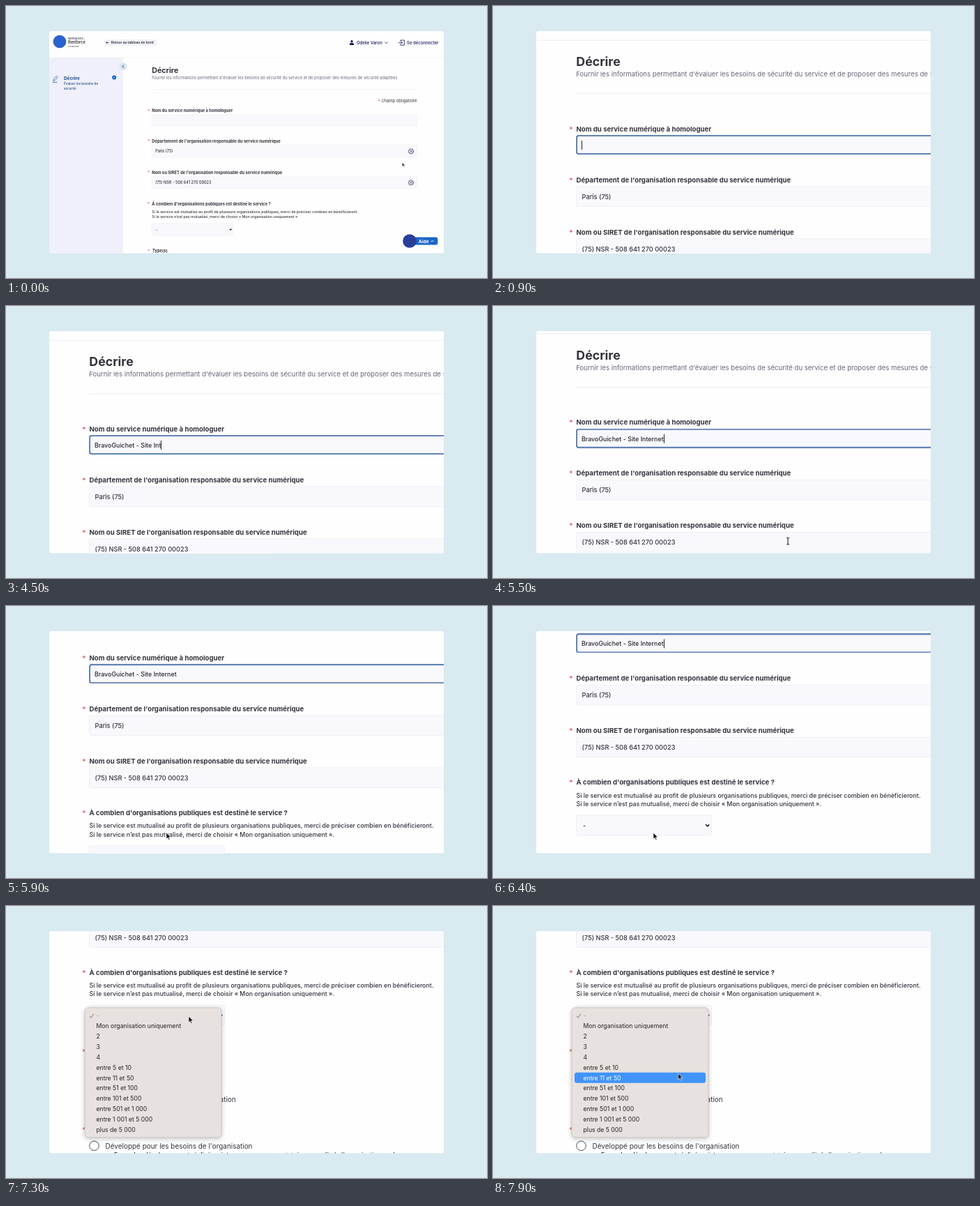
These frames come from a looping animation (690 px wide and 390 px high, 8000 ms). An HTML page:

```html
<!DOCTYPE html>
<html lang="fr">
<head>
<meta charset="utf-8">
<title>Décrire le service</title>
<style>
  html, body { margin: 0; width: 100%; height: 100%; overflow: hidden; background: #d9eaf1; }
  body { font-family: Inter, "Open Sans", sans-serif; }
  .card { position: absolute; left: 0; top: 0; width: 690px; height: 390px; background: #fefefe;
    clip-path: inset(36px 62px 35.5px 62px round 3px); }
  .layer, svg { position: absolute; left: 0; top: 0; width: 690px; height: 390px; }
  svg { overflow: visible; }

  /* every animation shares the same 8 s clock; 100 ms = 1.25 % */
  .zoom, .scroll, .mover { animation: 8s linear infinite; }
  .zoom { transform-origin: 344px 111px; animation-name: zoom; }
  .scroll { animation-name: scroll; }
  .mover { animation-name: move; }
  .ring, .caret, .arrow, .beam, .menu, .lit { animation: 8s step-end infinite; }
  .ring { animation-name: focus; }
  .caret { animation-name: blink; }
  .arrow { animation-name: arrow; }
  .beam { animation-name: beam; }
  .menu { animation-name: menu; }
  .lit.a { animation-name: lit-a; }
  .lit.b { animation-name: lit-b; }
  .lit.c { animation-name: lit-c; }

  @keyframes zoom {
    0% { transform: scale(.6); }
    1.25% { transform: scale(.6); animation-timing-function: ease-in-out; }
    10.6%, 100% { transform: scale(1); }
  }
  @keyframes scroll {
    0%, 66.25% { transform: translateY(0); }
    67.5% { transform: translateY(-1px); }
    68.75% { transform: translateY(-9px); }
    70% { transform: translateY(-36px); }
    71.25% { transform: translateY(-66px); }
    72.5% { transform: translateY(-88px); }
    73.75% { transform: translateY(-101.7px); }
    75%, 78.1% { transform: translateY(-107px); }
    80% { transform: translateY(-145px); }
    81.25% { transform: translateY(-198px); }
    82.5% { transform: translateY(-243px); }
    83.75% { transform: translateY(-272px); }
    85% { transform: translateY(-288px); }
    86.9% { transform: translateY(-299px); }
    88.75%, 100% { transform: translateY(-303px); }
  }
  @keyframes move {
    0%, 1.25% { transform: translate(718px, 300px); }
    6.25%, 66.2% { transform: translate(690px, 199px); }
    66.25% { transform: translate(560px, 300px); }
    68.75% { transform: translate(423.7px, 337.2px); }
    72.5%, 85.6% { transform: translate(230px, 325px); }
    88.75%, 95% { transform: translate(262px, 158px); }
    96.25% { transform: translate(264px, 176px); }
    97.5% { transform: translate(265px, 214px); }
    98.75%, 100% { transform: translate(265.5px, 239.7px); }
  }
  @keyframes focus { 0% { opacity: 0; } 6.25%, 100% { opacity: 1; } }
  @keyframes blink {
    0% { opacity: 0; } 6.25% { opacity: 1; } 15% { opacity: 0; }
    21.25% { opacity: 1; } 70% { opacity: 0; } 76.25%, 100% { opacity: 1; }
  }
  @keyframes arrow { 0% { opacity: 1; } 5.6% { opacity: 0; } 70%, 100% { opacity: 1; } }
  @keyframes beam {
    0% { opacity: 0; } 5.6% { opacity: 1; } 21.25% { opacity: 0; }
    66.25% { opacity: 1; } 70%, 100% { opacity: 0; }
  }
  @keyframes menu { 0% { opacity: 0; } 90%, 100% { opacity: 1; } }
  @keyframes lit-a { 0% { opacity: 0; } 96.25% { opacity: 1; } 97.5%, 100% { opacity: 0; } }
  @keyframes lit-b { 0% { opacity: 0; } 97.5% { opacity: 1; } 98.75%, 100% { opacity: 0; } }
  @keyframes lit-c { 0% { opacity: 0; } 98.75%, 100% { opacity: 1; } }

  .typed { position: absolute; left: 127px; top: 192.5px; height: 13px; margin: 0; display: flex;
    font-size: 8.9px; font-weight: 500; line-height: 13px; color: #26262e; white-space: pre; }
  .typed::before { content: ""; animation: type 8s step-end infinite; }
  .caret { width: 1px; height: 13px; background: #222; }

  text { fill: #33333d; }
  .label { font-size: 9.64px; font-weight: 700; }
  .star { font-size: 10px; font-weight: 600; fill: #e25560; }
  .value { font-size: 9.2px; font-weight: 500; }
  .hint { font-size: 8.81px; font-weight: 500; }
  .choice { font-size: 9.95px; }
  .sub { font-size: 9.58px; fill: #66667a; }
  .field { fill: #f8f8fd; stroke: #efeff5; }
  .box { fill: #fff; stroke: #4a4a54; }
  .rule { stroke: #ececf1; }
  .line { fill: none; stroke: #14165e; stroke-linecap: round; stroke-linejoin: round; }
  .navy { fill: #14165e; font-weight: 500; font-size: 6px; }
  .side { fill: #1f4f8c; font-weight: 500; font-size: 4.6px; }
  .menu text { font-size: 8.66px; fill: #262424; }
  .menu .off { fill: #a29c9a; }
  .menu .lit text, .help { fill: #fff; }
  .lit rect { fill: #4094fb; }
</style>
<script>
  // typing: one key per entry, in tenths of a second
  const phrase = "BravoGuichet - Site Internet";
  const keys = [17, 18, 20, 21, 22, 24, 26, 27, 28, 29, 30, 31, 32, 33,
    35, 36, 38, 39, 40, 42, 43, 44, 45, 47, 48, 49, 50, 50];
  const steps = keys.map((k, i) => `${k * 1.25}% { content: "${phrase.slice(0, i + 1)}"; }`);
  const sheet = document.createElement("style");
  sheet.textContent = `@keyframes type { 0% { content: ""; } ${steps.join(" ")} 100% { content: "${phrase}"; } }`;
  document.head.append(sheet);
</script>
</head>
<body>
<div class="card">
  <div class="layer zoom">
    <div class="layer scroll">
      <svg>
        <defs>
          <g id="clear" class="line" stroke-width="1.2">
            <circle r="5.8"/><path d="M-2.3-2.3 2.3 2.3M2.3-2.3-2.3 2.3"/>
          </g>
        </defs>

        <!-- header and sidebar, laid out at the unzoomed size -->
        <g transform="translate(-229.33 -74) scale(1.66667)">
          <rect x="62" y="74" width="106" height="400" fill="#eff0fa"/>
          <path class="rule" d="M62 74H628" stroke-width=".6"/>
          <circle cx="77" cy="51" r="9.3" fill="#2a62cf"/>
          <text x="89" y="48.4" font-size="4.1" font-weight="500">NotreSocle</text>
          <text x="89" y="54.4" font-size="5.7" font-weight="600">Renforcé</text>
          <text x="89" y="58.6" font-size="2.2">Innovation web</text>

          <rect x="141" y="48" width="75" height="9" rx="2" fill="#f1f2fb"/>
          <path class="line" stroke-width=".7" d="M147 52.5H143.6M145 51.1 143.6 52.5 145 53.9"/>
          <text x="150.8" y="54.3" font-size="4.9" font-weight="600">Retour au tableau de bord</text>

          <g fill="#14165e">
            <circle cx="496" cy="50.7" r="1.7"/>
            <path d="M493 56V54.8a1.8 1.8 0 0 1 1.8-1.8h2.4a1.8 1.8 0 0 1 1.8 1.8V56z"/>
          </g>
          <text class="navy" x="503" y="54.9">Odelie Varon</text>
          <path class="line" stroke-width=".8" d="M543.8 51.9 545.6 53.7 547.4 51.9"/>
          <path class="line" stroke-width=".8" d="M566 50.6V49H571.4V56.2H566V54.6M563.4 52.6H568.6M567 51 568.6 52.6 567 54.2"/>
          <text class="navy" x="575" y="54.9">Se déconnecter</text>

          <path class="line" style="stroke:#1d5caf" stroke-width=".8" d="M68 107 68.6 104.4 72.4 100.4 74.2 102.2 70.4 106.2zM67 109.4H73"/>
          <text x="83" y="105.8" font-size="6.4" font-weight="700" style="fill:#174a8f">Décrire</text>
          <text class="side" x="83" y="113">Évaluer les besoins de</text>
          <text class="side" x="83" y="119.8">sécurité</text>
          <circle cx="155.2" cy="102.4" r="3" fill="#0f5fc4"/>
          <path d="M154 103.6 156.3 101.3" stroke="#fff" stroke-width=".8" stroke-linecap="round"/>
          <circle cx="168" cy="86.6" r="5.6" fill="#d8e7f5"/>
          <path class="line" stroke-width=".9" d="M168.8 84.8 167 86.6 168.8 88.4"/>

          <text class="star" x="533.6" y="139" style="font-size:6px">*</text>
          <text x="538.8" y="138.2" font-size="6">champ obligatoire</text>
        </g>

        <!-- form -->
        <text x="119.3" y="86.2" font-size="17.8" font-weight="700">Décrire</text>
        <text class="sub" x="119.3" y="101.3">Fournir les informations permettant d'évaluer les besoins de sécurité du service et de proposer des mesures de sécurité adaptées</text>
        <path class="rule" d="M119.5 125.7H753"/>

        <text class="star" x="109.2" y="180.5">*</text>
        <text class="label" x="119.5" y="179.6">Nom du service numérique à homologuer</text>
        <rect class="field" x="119.5" y="185.5" width="634" height="27" rx="2"/>
        <rect class="ring" x="120.1" y="185.9" width="633" height="26.1" rx="2.5" fill="none" stroke="#345f9f" stroke-width="1.5"/>

        <text class="star" x="109.2" y="253.5">*</text>
        <text class="label" x="119.5" y="252.6">Département de l'organisation responsable du service numérique</text>
        <rect class="field" x="119.5" y="258.8" width="634" height="28.6" rx="2"/>
        <text class="value" x="127.6" y="276.6">Paris (75)</text>
        <use href="#clear" x="739" y="273.3"/>

        <text class="star" x="109.2" y="328.5">*</text>
        <text class="label" x="119.5" y="327.6">Nom ou SIRET de l'organisation responsable du service numérique</text>
        <rect class="field" x="119.5" y="333.7" width="634" height="28.6" rx="2"/>
        <text class="value" x="127.6" y="351.6">(75) NSR - 508 641 270 00023</text>
        <use href="#clear" x="739" y="348.2"/>

        <text class="star" x="109.2" y="403">*</text>
        <text class="label" x="119.5" y="402">À combien d'organisations publiques est destiné le service ?</text>
        <text class="hint" x="119.5" y="420.2">Si le service est mutualisé au profit de plusieurs organisations publiques, merci de préciser combien en bénéficieront.</text>
        <text class="hint" x="119.5" y="432.4">Si le service n’est pas mutualisé, merci de choisir « Mon organisation uniquement ».</text>
        <rect class="field" x="119.5" y="445.6" width="194" height="29" rx="2"/>
        <text class="value" x="129" y="463.6">-</text>
        <path d="M305.2 458.8 307.7 461.3 310.2 458.8" fill="none" stroke="#1c1c24" stroke-width="1.7"/>

        <text class="star" x="109.2" y="516">*</text>
        <text class="label" x="120.6" y="514.6">Type(s)</text>
        <rect class="box" x="119.8" y="527.3" width="13.4" height="13.4" rx="1.5"/>
        <rect class="box" x="119.8" y="550.7" width="13.4" height="13.4" rx="1.5"/>
        <rect class="box" x="119.8" y="574.1" width="13.4" height="13.4" rx="1.5"/>
        <text class="choice" x="142.6" y="537.5">Site Internet</text>
        <text class="choice" x="142.6" y="561">Application Mobile</text>
        <text class="choice" x="142.6" y="584.4">API mise à disposition par l'organisation</text>

        <text class="star" x="109.2" y="628">*</text>
        <text class="label" x="120.6" y="626.9">Provenance</text>
        <circle class="box" cx="126.5" cy="646.8" r="6.8"/>
        <text class="choice" x="142.6" y="651.4">Développé pour les besoins de l'organisation</text>
        <text class="hint" x="155" y="663">Exemple : développement réalisé en interne ou par un prestataire au profit de l'organisation seule</text>
      </svg>
      <p class="typed"><span class="caret"></span></p>
    </div>

    <svg>
      <!-- help button -->
      <g transform="translate(-229.33 -74) scale(1.66667)">
        <rect x="577" y="331.4" width="42.4" height="11" rx="3" fill="#1a66c8"/>
        <circle cx="579" cy="337" r="9.8" fill="#28409c"/>
        <text class="help" x="591.8" y="339.6" font-size="6.7" font-weight="700">Aide</text>
        <path d="M609.6 338.2 611.6 336.2 613.6 338.2" fill="none" stroke="#fff" stroke-width=".9"/>
      </g>

      <g class="menu">
        <rect x="113" y="145.8" width="196" height="186" rx="5" fill="#e7e1df" stroke="#c4bebc" stroke-width=".8"
          style="filter:drop-shadow(0 2px 3px rgba(0,0,0,.22))"/>
        <path d="M119.8 157.6 122 160.2 126 154.4" fill="none" stroke="#a29c9a" stroke-width="1.2"/>
        <text class="off" x="129.5" y="160.3">-</text>
        <text y="160.3">
          <tspan x="129.5" dy="14.87">Mon organisation uniquement</tspan>
          <tspan x="129.5" dy="14.87">2</tspan>
          <tspan x="129.5" dy="14.87">3</tspan>
          <tspan x="129.5" dy="14.87">4</tspan>
          <tspan x="129.5" dy="14.87">entre 5 et 10</tspan>
          <tspan x="129.5" dy="14.87">entre 11 et 50</tspan>
          <tspan x="129.5" dy="14.87">entre 51 et 100</tspan>
          <tspan x="129.5" dy="14.87">entre 101 et 500</tspan>
          <tspan x="129.5" dy="14.87">entre 501 et 1 000</tspan>
          <tspan x="129.5" dy="14.87">entre 1 001 et 5 000</tspan>
          <tspan x="129.5" dy="14.87">plus de 5 000</tspan>
        </text>
        <g class="lit a">
          <rect x="117" y="164.5" width="188" height="14.9" rx="3"/>
          <text x="129.5" y="175.2">Mon organisation uniquement</text>
        </g>
        <g class="lit b">
          <rect x="117" y="209.1" width="188" height="14.9" rx="3"/>
          <text x="129.5" y="219.8">4</text>
        </g>
        <g class="lit c">
          <rect x="117" y="238.8" width="188" height="14.9" rx="3"/>
          <text x="129.5" y="249.5">entre 11 et 50</text>
        </g>
      </g>

      <g class="mover">
        <path class="arrow" d="M0 0V9.2L2.1 7.3 3.5 10.5 5 9.9 3.6 6.7H6.5Z" fill="#111" stroke="#fff" stroke-width=".7"/>
        <path class="beam" d="M-2.2-5Q0-5 0-3.6Q0-5 2.2-5M0-3.6V3.6M-2.2 5Q0 5 0 3.6Q0 5 2.2 5" fill="none" stroke="#222" stroke-width="1.1"/>
      </g>
    </svg>
  </div>
</div>
</body>
</html>
```
